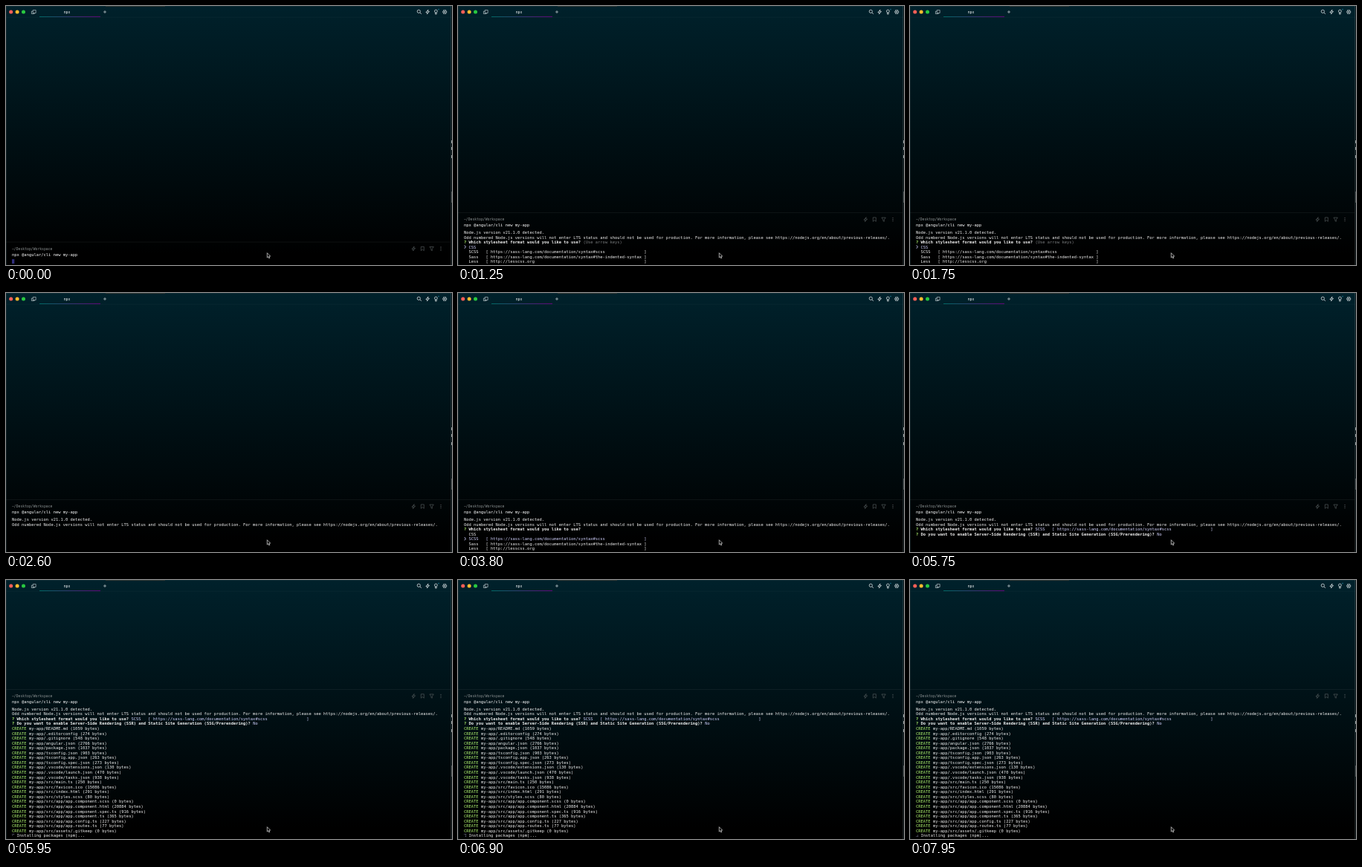
An HTML page with a canvas that plays this animation: 600x349 px, repeating every 8 s.

```html
<!DOCTYPE html>
<html lang="en">
<head>
<meta charset="utf-8">
<title>Terminal</title>
<style>
html, body { margin: 0; width: 100%; height: 100%; overflow: hidden; background: #000; }
canvas { display: block; width: 600px; height: 349px; }
</style>
</head>
<body>
<canvas id="stage" width="600" height="349"></canvas>
<script>
const ctx = document.getElementById('stage').getContext('2d');
const W = 600, H = 349, LOOP = 8000;
const LEFT = 8, FONT = 5.438, CELL = 3.274, LINE = 6.56, LAST_ROW = 344.3;
const WHITE = '#f1f1f1', GREEN = '#b4fa72', CYAN = '#d0d1fe', GREY = '#7c7f80';

const INSTALL_AT = 5900;
const SPINNER = ['124', '145', '1456', '456', '3456', '356', '236', '1236', '123', '1234'];

const seg = (text, color = WHITE, bold = false) => ({ text, color, bold });
const option = (name, url) => `${name}   [ ${url.padEnd(62)} ]`;
const SCSS = option('SCSS', 'https://sass-lang.com/documentation/syntax#scss');
const OPTIONS = [
  'CSS',
  SCSS,
  option('Sass', 'https://sass-lang.com/documentation/syntax#the-indented-syntax'),
  option('Less', 'http://lesscss.org'),
];

const FILES = `README.md 1059
.editorconfig 274
.gitignore 548
angular.json 2766
package.json 1037
tsconfig.json 903
tsconfig.app.json 263
tsconfig.spec.json 273
.vscode/extensions.json 130
.vscode/launch.json 470
.vscode/tasks.json 938
src/main.ts 250
src/favicon.ico 15086
src/index.html 291
src/styles.scss 80
src/app/app.component.scss 0
src/app/app.component.html 20884
src/app/app.component.spec.ts 916
src/app/app.component.ts 365
src/app/app.config.ts 227
src/app/app.routes.ts 77
src/assets/.gitkeep 0`.split('\n').map(line => {
  const [path, size] = line.split(' ');
  return [seg('CREATE', GREEN), seg(` my-app/${path} (${size} bytes)`)];
});

const NOTICE = [
  [seg('Node.js version v21.1.0 detected.')],
  [seg('Odd numbered Node.js versions will not enter LTS status and should not be used for production. ' +
    'For more information, please see https://nodejs.org/en/about/previous-releases/.')],
];

const question = (text, ...rest) => [seg('? ', GREEN, true), seg(text + ' ', WHITE, true), ...rest];
const askStyle = (...rest) => question('Which stylesheet format would you like to use?', ...rest);
const askSsr = (...rest) => question(
  'Do you want to enable Server-Side Rendering (SSR) and Static Site Generation (SSG/Prerendering)?', ...rest);

function menu(selected, hint) {
  return [...NOTICE, askStyle(seg(hint, GREY)),
    ...OPTIONS.map((text, i) => [seg('  ' + text, i === selected ? CYAN : WHITE)])];
}
const answered = ssr => [...NOTICE, askStyle(seg(SCSS, CYAN)), askSsr(ssr)];

// Each scene holds until its end time; height is the number of rows reserved above the bottom edge.
const SCENES = [
  { end: 150, height: 1, rows: [], cursor: [0, 0] },
  { end: 1250, height: 3, rows: NOTICE, cursor: [0, 2] },
  { end: 2600, height: 7, rows: menu(0, '(Use arrow keys)'), pointer: 3 },
  { end: 2650, height: 7, rows: NOTICE },
  { end: 4100, height: 7, rows: menu(1, ''), pointer: 4 },
  { end: 5500, height: 7, rows: answered(seg('(y/N)', GREY)), cursor: [105, 3] },
  { end: INSTALL_AT, height: 7, rows: answered(seg('No', CYAN)) },
  { end: LOOP, height: 27, spinner: 26,
    rows: [...answered(seg('No', CYAN)), ...FILES, [seg('  Installing packages (npm)...')]] },
];

// Text is laid out at ten times its size so that advances stay unrounded.
function text(str, x, y, color, { bold = false, size = FONT } = {}) {
  ctx.save();
  ctx.translate(x, y + 2);
  ctx.scale(0.1, 0.1);
  ctx.font = `${bold ? 'bold ' : ''}${size * 10}px "DejaVu Sans Mono", monospace`;
  ctx.fillStyle = color;
  ctx.fillText(str, 0, 0);
  ctx.restore();
}

function rect(x, y, w, h, color) {
  ctx.fillStyle = color;
  ctx.fillRect(x, y, w, h);
}

function disc(x, y, r, color) {
  ctx.fillStyle = color;
  ctx.beginPath();
  ctx.arc(x, y, r, 0, Math.PI * 2);
  ctx.fill();
}

function ring(x, y, r) {
  ctx.beginPath();
  ctx.arc(x, y, r, 0, Math.PI * 2);
  ctx.stroke();
}

function poly(x, y, points, closed = false) {
  ctx.beginPath();
  points.forEach(([px, py]) => ctx.lineTo(x + px, y + py));
  if (closed) ctx.closePath();
  ctx.stroke();
}

function pen(color, width) {
  ctx.strokeStyle = color;
  ctx.lineWidth = width;
}

const BOLT = [[0.8, -3], [-2.3, 0.6], [-0.2, 0.6], [-0.8, 3], [2.3, -0.6], [0.2, -0.6]];

function linear(x0, y0, x1, y1, from, to) {
  const g = ctx.createLinearGradient(x0, y0, x1, y1);
  g.addColorStop(0, from);
  g.addColorStop(1, to);
  return g;
}

function drawWindow() {
  rect(0, 0, W, H, linear(0, 0, 0, H - 15, '#00212b', '#000000'));
  rect(0, 14.8, W, 0.6, 'rgba(255,255,255,0.05)');
  rect(0, 0, W, 0.6, '#18343b');
  rect(134, 0, 80, 0.6, '#4a4238');
  rect(0, 0, 0.6, H, '#1d3035');
  rect(598.4, 0, 0.7, H, 'rgba(150,165,170,0.3)');
  rect(599.1, 0, 0.9, H, '#10191c');
  [181, 190, 201].forEach(y => rect(599, y, 1, 4, '#9da2a4'));
  rect(599, 250, 1, 15, '#4b5152');

  ['#ff5f57', '#febc2e', '#28c840'].forEach((c, i) => disc(6.7 + i * 8.4, 8, 2.5, c));

  pen('#b9c4c7', 0.7);
  ctx.strokeRect(36.2, 5.7, 3.9, 3.6);
  poly(34.4, 7.1, [[1.6, 0], [0, 0], [0, 3.4], [3.8, 3.4], [3.8, 2.2]]);
  text('npx', 77.7, 8, '#ffffff', { size: 4.76 });
  rect(45, 14, 82, 0.8, linear(45, 0, 127, 0, '#007972', '#7b008f'));
  pen('#c3cdd0', 0.7);
  poly(133, 8, [[-2, 0], [2, 0]]);
  poly(133, 8, [[0, -2], [0, 2]]);

  pen('#d7dee0', 0.8);
  ring(555.3, 7.3, 2.1);
  poly(556.9, 8.9, [[0, 0], [2, 2]]);
  poly(567.2, 8, BOLT, true);
  ring(578.4, 7, 1.9);
  poly(578.4, 9, [[-0.8, 0], [-0.8, 2], [0.8, 2], [0.8, 0]]);
  disc(582, 4.6, 0.8, '#1f6f8a');
  ring(590.2, 8, 2.3);
  ring(590.2, 8, 0.8);
  for (let i = 0; i < 6; i++) {
    const a = i * Math.PI / 3, c = Math.cos(a), s = Math.sin(a);
    poly(590.2, 8, [[c * 2.3, s * 2.3], [c * 3.1, s * 3.1]]);
  }
}

function drawBlockHeader(top) {
  const y = top - 17.3;
  rect(0, top - 26.6, 598, 0.7, 'rgba(255,255,255,0.08)');
  text('~/Desktop/Workspace', LEFT, y - 0.3, '#8b9192', { size: 4.76 });
  text('npx @angular/cli new my-app', LEFT, top - 9.8, '#ffffff');
  pen('#52595b', 0.7);
  poly(548.3, y, BOLT, true);
  poly(560.3, y, [[-2, -2.7], [2, -2.7], [2, 2.7], [0, 1], [-2, 2.7]], true);
  poly(572.6, y, [[-2.7, -2.5], [2.7, -2.5], [0.7, 0.3], [0.7, 2.7], [-0.7, 2], [-0.7, 0.3]], true);
  [-2.1, 0, 2.1].forEach(dy => disc(585, y + dy, 0.55, '#6a7173'));
}

function drawSpinner(y, t) {
  const index = Math.floor((t - INSTALL_AT) / 80) % SPINNER.length;
  for (const d of SPINNER[index]) {
    const n = d - 1;
    disc(LEFT + 0.9 + Math.floor(n / 3) * 1.5, y - 1.7 + (n % 3) * 1.4, 0.48, CYAN);
  }
}

function drawMouse() {
  ctx.beginPath();
  [[351.3, 332.7], [351.3, 339.1], [352.8, 337.8], [353.8, 340], [354.8, 339.5],
    [353.8, 337.4], [355.7, 337.2]].forEach(p => ctx.lineTo(...p));
  ctx.closePath();
  ctx.fillStyle = '#000';
  ctx.fill();
  pen('#e6e6e6', 0.7);
  ctx.stroke();
}

function draw(t) {
  const scene = SCENES.find(s => t < s.end);
  const top = LAST_ROW - (scene.height - 1) * LINE;
  const rowY = row => top + row * LINE;

  drawWindow();
  drawBlockHeader(top);
  scene.rows.forEach((row, i) => {
    let col = 0;
    for (const { text: str, color, bold } of row) {
      text(str, LEFT + col * CELL, rowY(i), color, { bold });
      col += str.length;
    }
  });
  if (scene.cursor) {
    const [col, row] = scene.cursor;
    rect(LEFT + col * CELL, rowY(row) - 3.1, CELL, LINE - 0.6, '#33307f');
  }
  if (scene.pointer) {
    pen(CYAN, 0.9);
    poly(LEFT + 0.8, rowY(scene.pointer), [[0, -2.1], [1.5, 0], [0, 2.1]]);
  }
  if (scene.spinner) drawSpinner(rowY(scene.spinner), t);
  drawMouse();
}

const start = performance.now();
function tick() {
  draw((performance.now() - start) % LOOP);
  requestAnimationFrame(tick);
}
tick();
</script>
</body>
</html>
```
